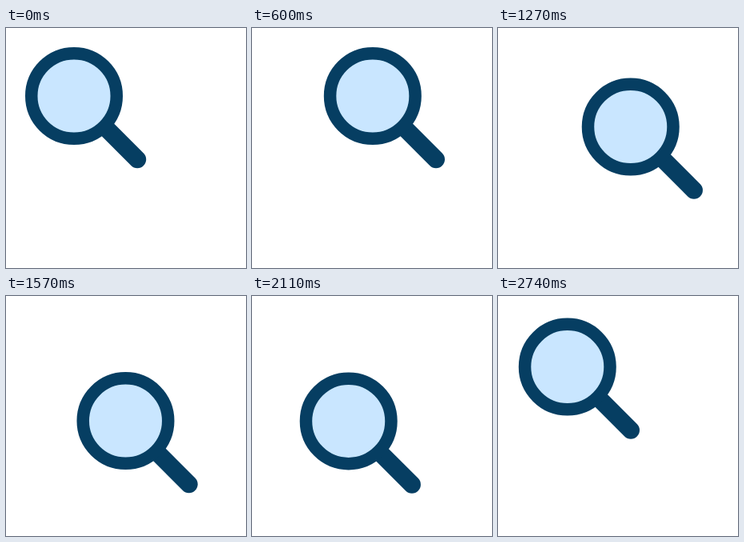
An HTML page with a canvas that plays this animation: 300x300 px, repeating every 2.78 s.

```html
<!DOCTYPE html>
<html lang="en">
<head>
<meta charset="utf-8">
<title>Searching</title>
<style>
  html, body { margin: 0; width: 100%; height: 100%; overflow: hidden; background: #fff; }
  canvas { display: block; width: 300px; height: 300px; }
</style>
</head>
<body>
<canvas id="stage"></canvas>
<script>
const SIZE = 300;
const LOOP = 2780;
const STEP = 33.45;
const STEPS = 83;
const NAVY = '#063e62';
const GLASS = '#c9e6ff';

// Corners of the triangular path, with the step at which each is reached
const path = [
  { at: 0, x: 85, y: 85 },
  { at: 27.35, x: 185, y: 85 },
  { at: 55, x: 135, y: 185 },
  { at: STEPS, x: 85, y: 85 }
];

const canvas = document.getElementById('stage');
const ctx = canvas.getContext('2d');
const ratio = window.devicePixelRatio || 1;
canvas.width = canvas.height = SIZE * ratio;

function positionAt(step) {
  const i = path.findIndex(p => p.at > step);
  const a = path[i - 1], b = path[i];
  const k = (step - a.at) / (b.at - a.at);
  return { x: a.x + (b.x - a.x) * k, y: a.y + (b.y - a.y) * k };
}

function drawMagnifier(x, y) {
  ctx.save();
  ctx.translate(x, y);
  ctx.strokeStyle = NAVY;

  ctx.lineCap = 'round';
  ctx.lineWidth = 22;
  ctx.beginPath();
  ctx.moveTo(38, 38);
  ctx.lineTo(79.2, 79.2);
  ctx.stroke();

  ctx.fillStyle = GLASS;
  ctx.lineWidth = 15.5;
  ctx.beginPath();
  ctx.arc(0, 0, 53.25, 0, Math.PI * 2);
  ctx.fill();
  ctx.stroke();
  ctx.restore();
}

function render(now) {
  const t = now % LOOP;
  const step = Math.min(STEPS - 1, Math.floor((t + 6) / STEP));
  const { x, y } = positionAt(step);
  ctx.setTransform(ratio, 0, 0, ratio, 0, 0);
  ctx.fillStyle = '#fff';
  ctx.fillRect(0, 0, SIZE, SIZE);
  drawMagnifier(x, y);
}

const start = performance.now();
function tick() {
  render(performance.now() - start);
  requestAnimationFrame(tick);
}
tick();
</script>
</body>
</html>
```
